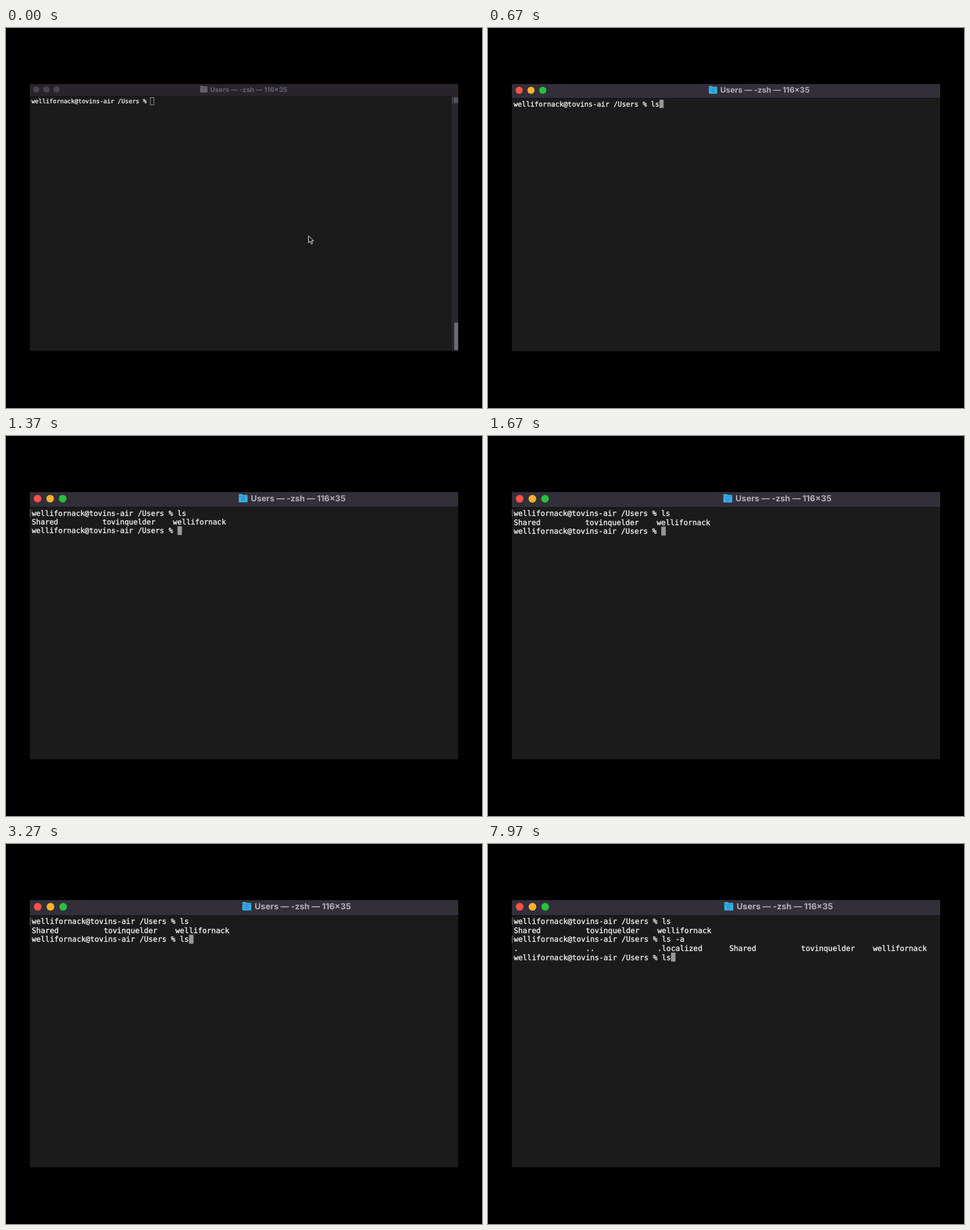
Write an HTML page that moves like this. It is 720 px wide and 576 px high and loops after 8000 ms.

```html
<!DOCTYPE html>
<html lang="en">
<head>
<meta charset="utf-8">
<title>Terminal</title>
<style>
  html, body { margin: 0; width: 100%; height: 100%; overflow: hidden; background: #000; }
  svg { display: block; width: 720px; height: 576px; }
  text { white-space: pre; text-rendering: geometricPrecision; }
  .mono { font: 9.05px "DejaVu Sans Mono", monospace; fill: #f6f6f6; stroke: #f6f6f6; stroke-width: .25px; }
  .title { font: 700 10.2px Inter, sans-serif; }
</style>
</head>
<body>
<svg viewBox="0 0 720 576">
  <defs><clipPath id="view"><rect x="36" y="85" width="648" height="405"/></clipPath></defs>
  <rect width="720" height="576" fill="#000"/>
  <g clip-path="url(#view)">
    <g id="win">
      <rect width="648" height="404.4" fill="#1b1b1b"/>
      <rect id="bar" width="648" height="18.5"/>
      <rect y="18.4" width="648" height=".8" fill="#111"/>
      <g id="lights"></g>
      <g id="folder">
        <path d="M257.8 3.4q0-1 1-1h3l1.2 1.1h4.7q1 0 1 1v7.2q0 1-1 1h-8.9q-1 0-1-1z"/>
        <path d="M257.8 5.2h10.9" stroke="#1c1c24" stroke-opacity=".3" stroke-width=".7"/>
        <circle cx="263.2" cy="8.6" r="1.8" fill="none" stroke="#14405e" stroke-opacity=".45" stroke-width=".8"/>
      </g>
      <text id="title" class="title" x="272.7" y="11.6">Users — -zsh — 116×35</text>
      <g id="scroll">
        <rect x="638" y="18.5" width="10" height="385.9" fill="#2a2530"/>
        <rect x="638" y="19" width="10" height="11.5" fill="#39353e"/>
        <path d="M642.5 21.8h6v4.8h-6zM642.5 24.2h6" fill="none" stroke="#8d8a90" stroke-width=".8"/>
        <rect x="642" y="361" width="6" height="42.5" rx="2.8" fill="#6c6a70"/>
      </g>
      <g id="marks" fill="none" stroke="#8a8a8a" stroke-width=".7"></g>
      <rect id="caret" width="5.45" height="10.85"/>
      <g id="rows"></g>
      <path id="mouse" d="M421.6 230v10.6l2.5-2.3 1.7 4 1.9-.8-1.7-3.9h3.3z" fill="#111" stroke="#f4f4f4" stroke-width=".9" stroke-linejoin="round"/>
    </g>
  </g>
</svg>
<script>
const LOOP = 8000, FRAME = 100 / 3;
const COL = 5.45, ROW = 10.85, LEFT = 2.4, TOP = 20.5, BASE = 29.2;
const NS = "http://www.w3.org/2000/svg";
const $ = id => document.getElementById(id);

function add(parent, tag, attrs) {
  const el = document.createElementNS(NS, tag);
  for (const k in attrs) el.setAttribute(k, attrs[k]);
  return parent.appendChild(el);
}

const columns = words => words.map(w => w.padEnd(16)).join("").trimEnd();
const prompt = "wellifornack@tovins-air /Users % ";
const users = ["Shared", "tovinquelder", "wellifornack"];
const first = [prompt + "ls", columns(users)];
const second = [prompt + "ls -a", columns([".", "..", ".localized", ...users])];

// Each step: start time, lines on screen, number of entered commands.
const steps = [
  [0, [prompt], 0],
  [100, [prompt + "l"], 0],
  [430, [prompt + "ls"], 0],
  [700, [prompt + "ls", ""], 1],
  [770, [...first, prompt], 1],
  [3270, [...first, prompt + "ls"], 1],
  [4030, [...first, prompt + "ls "], 1],
  [4230, [...first, prompt + "ls -"], 1],
  [4470, [...first, prompt + "ls -a"], 1],
  [5070, [...first, prompt + "ls -a", ""], 2],
  [5130, [...first, ...second, prompt], 2],
  [7670, [...first, ...second, prompt + "l"], 2],
  [7800, [...first, ...second, prompt + "ls"], 2]
];

const lights = [["#ff5148", 9.6], ["#fdb22d", 25.1], ["#27c13f", 40.5]].map(
  ([color, cx]) => ({ color, el: add($("lights"), "circle", { cx, cy: 8.1, r: 4.7 }) }));
const rows = [0, 1, 2, 3, 4].map(
  i => add($("rows"), "text", { class: "mono", x: LEFT, y: BASE + i * ROW }));
const marks = [0, 2].map(
  i => add($("marks"), "path", { d: `M1.6 ${TOP + 1.6 + i * ROW}h-1v7.6h1` }));

// Quick start, then a quadratic settle.
function zoom(t) {
  const rest = Math.max(0, 0.906 - 0.00045 * t) + 0.094 * Math.exp(-t / 110);
  return 1 + 0.2468 * (1 - rest * rest);
}

function draw(now) {
  const t = now % LOOP;
  const active = t >= 30;
  const tick = Math.floor((t + 3.4) / FRAME) * FRAME;
  $("win").setAttribute("transform", `translate(36 85) scale(${zoom(tick)})`);

  $("bar").setAttribute("fill", active ? "#322f38" : "#29232d");
  $("title").setAttribute("fill", active ? "#b2afb5" : "#68636b");
  $("folder").setAttribute("fill", active ? "#36aeea" : "#68636b");
  for (const { color, el } of lights) el.setAttribute("fill", active ? color : "#4a454d");
  $("mouse").setAttribute("visibility", t < 100 ? "visible" : "hidden");

  const [, lines, entered] = steps.filter(s => s[0] <= t).pop();
  rows.forEach((el, i) => {
    const text = lines[i] || "";
    if (el.textContent !== text) el.textContent = text;
  });
  marks.forEach((el, i) => el.setAttribute("visibility", i < entered ? "visible" : "hidden"));

  const last = lines.length - 1, caret = $("caret");
  caret.setAttribute("x", LEFT + lines[last].length * COL);
  caret.setAttribute("y", TOP + last * ROW);
  caret.setAttribute("fill", active ? "#989898" : "none");
  caret.setAttribute("stroke", active ? "none" : "#8c8c8c");
}

const start = performance.now();
function loop() {
  draw(performance.now() - start);
  requestAnimationFrame(loop);
}
draw(0);
loop();
</script>
</body>
</html>
```
